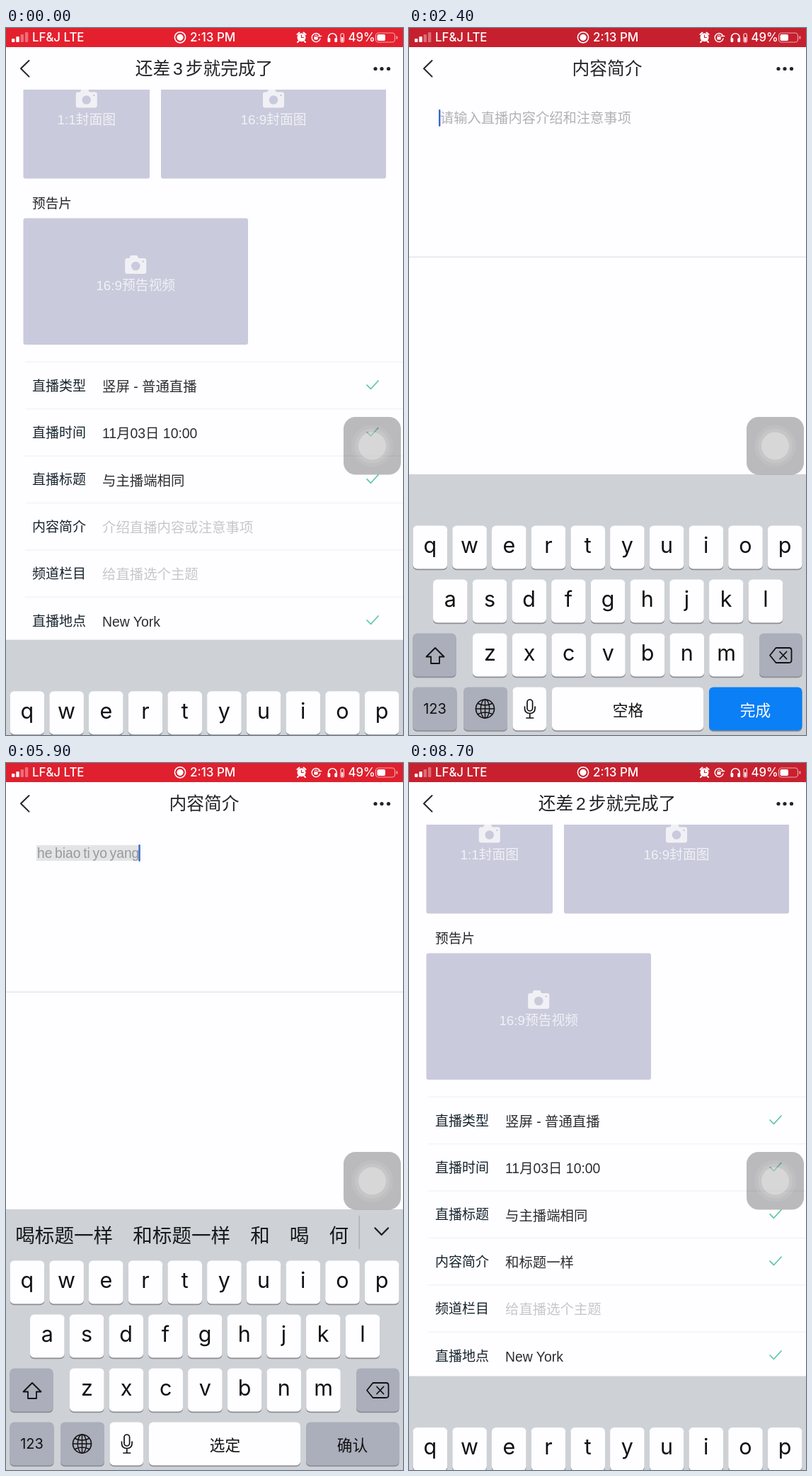
Write an HTML page that moves like this. It is 561 px wide and 998 px high and loops after 8800 ms.

```html
<!DOCTYPE html>
<html lang="zh-CN">
<head>
<meta charset="utf-8">
<title>直播设置</title>
<style>
  html, body { margin: 0; width: 100%; height: 100%; overflow: hidden; background: #fefdff; }
  svg { display: block; width: 100%; height: 100%; }
  text { font-family: "Liberation Sans", "Noto Sans CJK SC", "Noto Sans CJK", sans-serif; white-space: pre; }
  .ui { font-family: Inter, "Noto Sans CJK SC", "Noto Sans CJK", sans-serif; }
  .line { fill: none; stroke-linecap: round; stroke-linejoin: round; }
  .mid { text-anchor: middle; }
</style>
</head>
<body>
<svg id="stage" viewBox="0 0 561 998"></svg>
<script>
const LOOP = 8800, STEP = 100, W = 561, KB_TOP = 630, KB_HEIGHT = 368;
const PAPER = '#fefdff', INK = '#232427', CARD = '#c9cadc', GREY_KEY = '#abaebb';

const rect = (x, y, w, h, fill, r = 0, extra = '') =>
  `<rect x="${x}" y="${y}" width="${w}" height="${h}" rx="${r}" fill="${fill}" ${extra}/>`;
const circle = (x, y, r, fill, extra = '') => `<circle cx="${x}" cy="${y}" r="${r}" fill="${fill}" ${extra}/>`;
const line = (d, color, width, extra = '') =>
  `<path class="line" d="${d}" stroke="${color}" stroke-width="${width}" ${extra}/>`;
const text = (s, x, y, size, fill, cls = '', extra = '') =>
  `<text x="${x}" y="${y}" font-size="${size}" fill="${fill}" class="${cls}" ${extra}>${s}</text>`;
const group = (id, content) => `<g id="${id}">${content}</g>`;

// Pages
const header = title => rect(0, 27, W, 60, PAPER) +
  line('M32.5 46L21 57.3L32.5 68.6', INK, 2) +
  [522, 531, 540.5].map(x => circle(x, 57.5, 2.6, INK)).join('') +
  text(title, 280, 65.6, 24.7, INK, 'mid');

const card = (x, y, w, h, label) => {
  const cx = x + w / 2, cy = y + 66.5;
  return rect(x, y, w, h, CARD, 3) +
    `<path fill="#f1f1f5" d="M${cx - 12} ${cy - 10}h3l2-4h9l2 4h8q3 0 3 3v16q0 3-3 3h-24q-3 0-3-3v-16q0-3 3-3z"/>` +
    circle(cx, cy + 1, 6.3, CARD) + circle(cx + 10.5, cy - 5.5, 1.3, CARD) +
    text(label, cx, cy + 35, 18.8, '#f1f1f5', 'mid');
};

const tick = (y, extra = '') => line(`M510 ${y}l5.5 5.5L526 ${y - 6}`, '#5cc8a0', 1.7, extra);

const rows = [
  ['直播类型', '竖屏 - 普通直播', true],
  ['直播时间', '11月03日 10:00', true],
  ['直播标题', '与主播端相同', true],
  ['内容简介', '介绍直播内容或注意事项', false],
  ['频道栏目', '给直播选个主题', false],
  ['直播地点', 'New York', true]
];

const formRow = ([label, value, done], i) => {
  const y = 504 + i * 66.4, intro = i === 3;
  return text(label, 37, y + 7.6, 19, '#16232d') +
    text(value, 136, y + 8.8, 19.4, done ? '#2b2c2f' : '#c7c7cb', '', intro ? 'id="introValue"' : '') +
    (done || intro ? tick(y, intro ? 'id="introTick"' : '') : '');
};

const formPage = rect(0, 27, W, 971, PAPER) +
  card(24.5, 34, 178.5, 178.5, '1:1封面图') + card(219, 34, 318, 178.5, '16:9封面图') +
  text('预告片', 37, 254, 18.7, '#222428') + card(24.5, 268.5, 317.5, 178.5, '16:9预告视频') +
  rows.map(formRow).join('') +
  [0, 1, 2, 3, 4, 5, 6].map(i => rect(27, 470.7 + i * 66.4, 534, 1.3, '#f2f2f5')).join('') +
  header('还差<tspan id="stepsLeft" dx="4">3</tspan><tspan dx="4">步就完成了</tspan>');

const editPage = rect(0, 27, W, 971, PAPER) + header('内容简介') +
  rect(0, 322.5, W, 1.6, '#e7e7ea') +
  rect(43, 116, 0, 22, '#e3e5e5', 0, 'id="marked"') +
  text('', 44, 133.5, 19.3, '#a0a1a3', '', 'id="input"') +
  rect(0, 115, 2.4, 24, '#3767cd', 1, 'id="caret"');

// Keyboard
const KEY_W = 48.6, KEY_H = 61, PITCH = 55.7;
const keyPos = {};
[['qwertyuiop', 5.6], ['asdfghjkl', 34], ['zxcvbnm', 90]].forEach(([letters, left], row) =>
  [...letters].forEach((c, i) => keyPos[c] = [left + i * PITCH, 702.5 + row * 76]));

const key = (x, y, w, fill, id = '') =>
  rect(x, y + 1.7, w, KEY_H, '#8b8e93', 6) + rect(x, y, w, KEY_H, fill, 6, id);
const letterKey = ([c, [x, y]]) => key(x, y, KEY_W, PAPER) +
  text(c, x + KEY_W / 2, y + 38.5, 30.5, '#111', 'ui mid');

const icons =
  line('M37 875L24.5 887.5H31V897H43V887.5H49.5Z', '#111', 1.8) +
  line('M510 885.5L518.5 875H537Q540.5 875 540.5 878.5V892.5Q540.5 896 537 896H518.5Z' +
       'M524 880.5l9.5 10m0-10l-9.5 10', '#111', 1.8) +
  line('M94.5 961H120.5M107.5 948V974M97.5 953.5Q107.5 958.5 117.5 953.5M97.5 968.5Q107.5 963.5 117.5 968.5', '#111', 1.4) +
  circle(107.5, 961, 13, 'none', 'stroke="#111" stroke-width="1.6"') +
  `<ellipse cx="107.5" cy="961" rx="6.2" ry="13" fill="none" stroke="#111" stroke-width="1.4"/>` +
  rect(167, 948, 7.6, 16, 'none', 3.8, 'stroke="#111" stroke-width="1.7"') +
  line('M163.5 958v2q0 7.5 7.3 7.5t7.3-7.5v-2M170.8 967.5v6M166 974h9.6', '#111', 1.7);

const keyboard = rect(0, KB_TOP, W, KB_HEIGHT + 2, '#ced2d6') +
  group('candidateBar', group('candidates', '') + rect(498.5, 639, 1.4, 47, '#abafb3') +
    line('M521.5 656.5L530.7 666L540 656.5', '#202124', 2.4)) +
  Object.entries(keyPos).map(letterKey).join('') +
  key(5.5, 854.5, 61, GREY_KEY) + key(495, 854.5, 60.5, GREY_KEY) +
  key(5.5, 930.5, 62, GREY_KEY) + key(77, 930.5, 62, GREY_KEY) +
  key(146.5, 930.5, 47.5, PAPER) + key(202, 930.5, 214, PAPER) +
  key(424, 930.5, 131.5, PAPER, 'id="doneKey"') +
  text('123', 36.5, 968, 20, '#111', 'ui mid') +
  text('空格', 309.5, 970.5, 21.7, '#111', 'mid', 'id="spaceLabel"') +
  text('完成', 489.5, 970.5, 21.7, '#111', 'mid', 'id="doneLabel"') +
  icons + group('popup', '');

const popupShape = c => {
  const [x, y] = keyPos[c], l = x - 18, r = x + 67, e = x + KEY_W;
  return `<path fill="${PAPER}" style="filter:drop-shadow(0 1px 3px rgba(0,0,0,.3))" d="M${l} ${y - 70}q0-13 13-13H${r - 13}q13 0 13 13` +
    `V${y - 24}C${r} ${y - 8} ${e} ${y - 8} ${e} ${y + 12}V${y + 55}q0 6-6 6H${x + 6}q-6 0-6-6` +
    `V${y + 12}C${x} ${y - 8} ${l} ${y - 8} ${l} ${y - 24}Z"/>` +
    text(c, x + KEY_W / 2, y - 29, 43, '#111', 'ui mid');
};

// Overlays
const touch = rect(477, 549, 81, 81.5, 'rgba(70,70,74,.37)', 17) +
  circle(517.5, 590, 29.5, 'rgba(255,255,255,.08)') +
  circle(517.5, 590, 24.5, 'rgba(255,255,255,.1)') +
  circle(517.5, 590, 19.5, 'rgba(255,255,255,.3)');

const statusBar = rect(0, 0, W, 27, '#e6202f', 0, 'id="statusFill"') +
  [0, 1, 2, 3].map(i => rect(8 + i * 6.3, 15 - i * 3, 4.4, 5 + i * 3, '#fff', 1, i > 1 ? 'opacity=".35"' : '')).join('') +
  text('LF&amp;J LTE', 37, 19.2, 16.8, '#fff', 'ui', 'font-weight="500"') +
  circle(246, 13.3, 7.6, 'none', 'stroke="#fff" stroke-width="1.6"') + circle(246, 13.3, 4.6, '#fff') +
  text('2:13 PM', 260, 19.2, 17, '#fff', 'ui', 'font-weight="500"') +
  circle(417.5, 13.3, 6, '#fff') + line('M411.5 9l3-2.5M423.5 9l-3-2.5M413.5 18.5l-1.5 1.5M421.5 18.5l1.5 1.5', '#fff', 2) +
  line('M417.5 10v3.5h3', '#d5202f', 1.2) +
  line('M443.8 11.5A6 6 0 1 0 444 15M441.5 11.5h4.2', '#fff', 1.4) + rect(435.3, 12.5, 5.4, 4, '#fff', 1) +
  line('M436.4 12.5v-1q0-1.6 1.6-1.6t1.6 1.6v1', '#fff', 1) +
  line('M455.5 16v-2.5a5.8 5.8 0 0 1 11.6 0V16', '#fff', 1.5) +
  rect(454.5, 14, 3.8, 6, '#fff', 1.5) + rect(464.3, 14, 3.8, 6, '#fff', 1.5) +
  rect(473, 8, 4.4, 12, 'none', 1.2, 'stroke="#fff"') + rect(474.2, 13, 2, 6, '#fff') +
  text('49%', 483.5, 19.2, 16.8, '#fff', 'ui', 'font-weight="500"') +
  rect(522.5, 7, 27, 13, 'none', 3.8, 'stroke="#fff" stroke-opacity=".6" stroke-width="1.2"') +
  rect(524.5, 9, 11.5, 9, '#fff', 2) + rect(551.5, 11.3, 1.8, 4.5, '#fff', 1, 'opacity=".6"');

document.getElementById('stage').innerHTML =
  group('form', formPage) + rect(0, 27, W, 971, '#000', 0, 'id="dim"') +
  group('edit', editPage) + group('keyboard', keyboard) + group('touch', touch) + statusBar +
  rect(22.3, 680.3, 339.5, 53, 'none', 3, 'id="frame" stroke="#fd0205" stroke-width="5.2"');

const el = Object.fromEntries([...document.querySelectorAll('[id]')].map(n => [n.id, n]));

// Timeline
const TYPE_START = 3340, KEY_STEP = 178, PRESS = 115, COMMIT = 6800, SAVED = 8000, KB_LEAVE = 8612;
const letters = [...'hebiaotiyoyang'];
const wordStarts = [2, 6, 8, 10];
const candidateSets = [
  '和 好 会 还 很 后 或 回',
  '和 喝 何 河 合 核 呵 盒',
  '河北 和 喝 何 河 合 核',
  '何必 和你 隔壁 胳膊 鹤壁 合璧',
  '和 喝 何 河 合 核 呵 盒',
  '喝标 和标 和 喝 何 河',
  '和标题 喝标题 和 喝 何',
  '和标题 喝标题 和 喝 何',
  '和标题有 喝标题有 和 喝 何',
  '和标题哟 喝标题哟 和 喝 何',
  '喝标题一样 和标题一样 和 喝 何'
];
const nextWords = '的 了 可以 一样 吗 是 都 在';
const statusGlow = [[0, .95], [1400, 1], [2400, 0], [4100, .45], [5900, .8], [8200, .15], [8700, .05], [8800, 0]];

const clamp = v => Math.max(0, Math.min(1, v));
const span = (t, start, length) => clamp((t - start) / length);
const easeOut = u => 1 - (1 - u) ** 3;
const easeInOut = u => (1 - Math.cos(Math.PI * u)) / 2;
const move = (node, x, y) => node.setAttribute('transform', `translate(${x} ${y})`);
const show = (node, on) => node.style.display = on ? '' : 'none';
const once = {};
const update = (name, value, apply) => { if (once[name] !== value) { once[name] = value; apply(value); } };

function lookup(table, t) {
  const i = table.findIndex(([time]) => time > t);
  const [[t0, a], [t1, b]] = [table[i - 1], table[i]];
  return a + (b - a) * (t - t0) / (t1 - t0);
}

function layCandidates(words) {
  let x = 13.2;
  el.candidates.innerHTML = words.split(' ').map(word => {
    const out = text(word, x, 677, 27.6, '#17181a');
    x += word.length * 27.6 + 28;
    return out;
  }).join('');
}

function caretOpacity(t) {
  const p = (t - 1850 + LOOP) % 1000;
  return p < 500 ? 1 : p < 600 ? (600 - p) / 100 : p < 900 ? 0 : (p - 900) / 100;
}

function drawInput(t) {
  const typed = Math.max(0, Math.min(letters.length, Math.floor((t - TYPE_START - PRESS) / KEY_STEP) + 1));
  const committed = t >= COMMIT, composing = typed > 0 && !committed;
  const pinyin = letters.slice(0, typed).map((c, i) => (wordStarts.includes(i) ? ' ' : '') + c).join('');
  const value = committed ? '和标题一样' : pinyin;

  update('input', value, v => {
    el.input.textContent = v || '请输入直播内容介绍和注意事项';
    el.input.style.fill = v ? '#98999b' : '#b0b1b4';
    el.input.style.wordSpacing = composing ? '-1.7px' : '0';
    const width = v ? el.input.getComputedTextLength() : 0;
    el.marked.setAttribute('width', composing ? width + 1 : 0);
    el.caret.setAttribute('x', v ? 43 + width : 42);
  });
  el.caret.style.opacity = composing || t < 1850 ? 1 : caretOpacity(t);

  const words = t >= KB_LEAVE ? '' : committed ? nextWords :
    composing ? candidateSets[Math.min(typed, candidateSets.length) - 1] : '';
  update('words', words, w => { show(el.candidateBar, w); if (w) layCandidates(w); });

  el.spaceLabel.textContent = composing ? '选定' : '空格';
  el.doneLabel.textContent = composing ? '确认' : '完成';
  el.doneKey.style.fill = composing ? GREY_KEY : committed ? PAPER : '#0a7ff6';
  el.doneLabel.style.fill = composing || committed ? '#111' : '#fff';

  const since = t - TYPE_START, index = Math.floor(since / KEY_STEP);
  const pressed = since >= 0 && since % KEY_STEP < PRESS && letters[index] || '';
  update('popup', pressed, c => el.popup.innerHTML = c && popupShape(c));
}

function draw(t) {
  const pushed = easeInOut(span(t, 1300, 490)) - easeInOut(span(t, 8160, 410));
  move(el.form, -W * pushed / 2, 0);
  move(el.edit, W * (1 - pushed), 0);
  el.dim.style.opacity = pushed / 2;

  const hidden = easeOut(span(t, -87, 305)) - easeOut(span(t, 1340, 305)) + easeOut(span(t, KB_LEAVE, 305));
  move(el.keyboard, 0, KB_HEIGHT * hidden);
  const lowered = easeInOut(span(t, 220, 300)) - easeInOut(span(t, 1600, 300));
  move(el.touch, 0, 297.5 * lowered);

  update('saved', t >= SAVED, saved => {
    el.stepsLeft.textContent = saved ? 2 : 3;
    el.introValue.textContent = saved ? '和标题一样' : rows[3][1];
    el.introValue.style.fill = saved ? '#2b2c2f' : '';
    show(el.introTick, saved);
  });
  show(el.frame, t >= 500 && t < 1600);

  const glow = lookup(statusGlow, t);
  el.statusFill.style.fill = `rgb(${198 + 32 * glow}, 32, 46)`;
  drawInput(t);
}

// The picture holds for STEP ms; the small lead absorbs timer rounding.
const startTime = performance.now() - 15;
function tickFrame() {
  const elapsed = (performance.now() - startTime) % LOOP;
  update('time', Math.floor(elapsed / STEP) * STEP, draw);
  requestAnimationFrame(tickFrame);
}
tickFrame();
</script>
</body>
</html>
```
